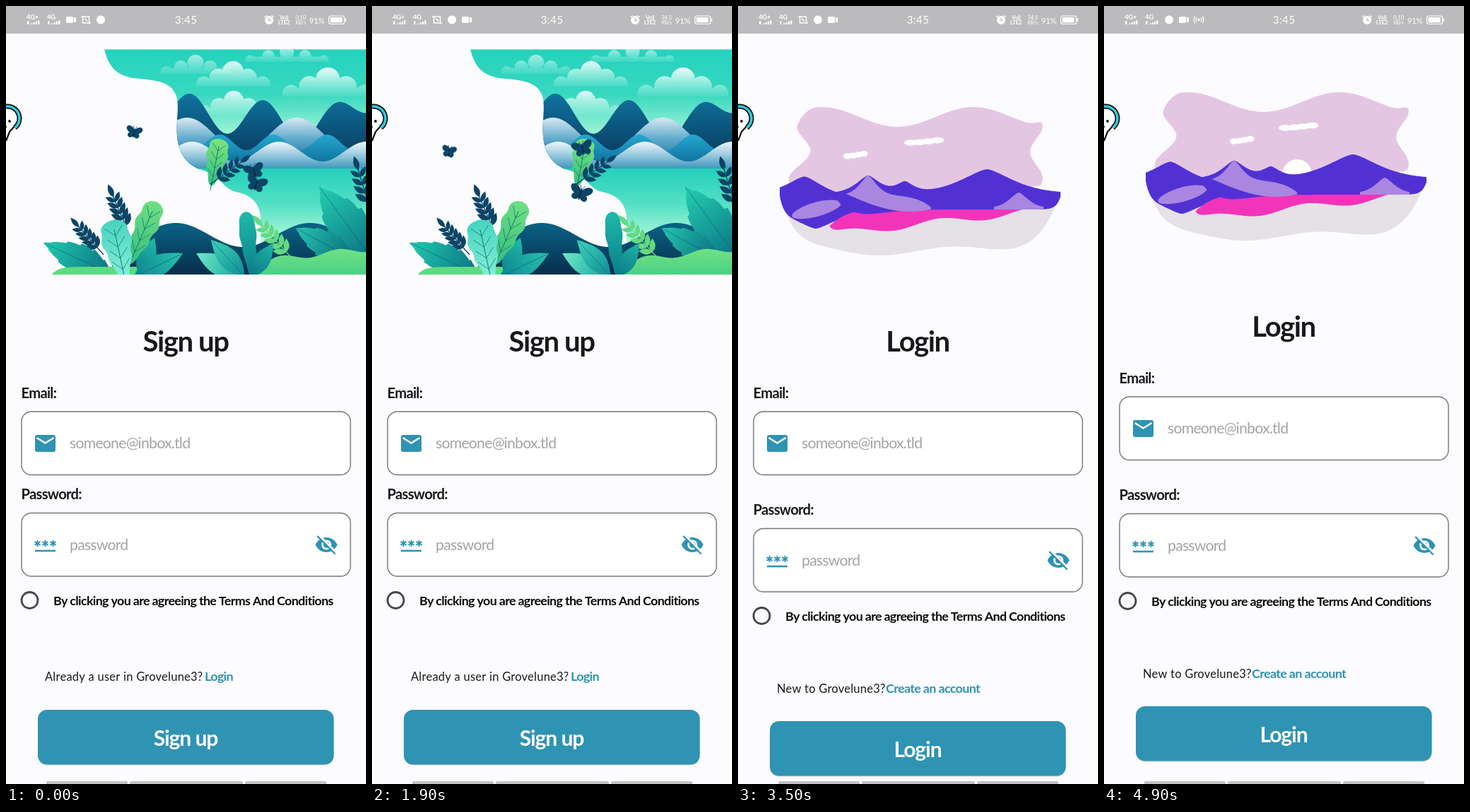
These frames come from a looping animation (509 by 1101 pixels, 5 s). An HTML page with a canvas:

```html
<!DOCTYPE html>
<html lang="en">
<head>
<meta charset="utf-8">
<title>Sign up and login</title>
<style>
html, body { margin: 0; width: 100%; height: 100%; overflow: hidden; background: #fcfbfe; }
canvas { display: block; width: 100vw; height: 100vh; }
</style>
</head>
<body>
<canvas id="stage" width="509" height="1101"></canvas>
<script>
const ctx = document.getElementById('stage').getContext('2d');
const BLUE = '#2f93b3', NAVY = '#0a4566', INK = '#18181b', PAGE = '#fcfbfe', VEIN = '#0f7870';
const APP = 'Grovelune3';
const { PI, sin, cos, exp, abs, sqrt, max, min } = Math;

// ---- drawing helpers ----
function vgrad(y0, y1, ...stops) {
  const g = ctx.createLinearGradient(0, y0, 0, y1);
  stops.forEach((c, i) => g.addColorStop(i / (stops.length - 1), c));
  return g;
}

function at(x, y, angle, draw) {
  ctx.save();
  ctx.translate(x, y);
  ctx.rotate(angle);
  draw();
  ctx.restore();
}

function text(str, x, y, size, color, weight = 700, align = 'left', tracking = -.035) {
  ctx.font = `${weight} ${size}px Lato, sans-serif`;
  ctx.letterSpacing = tracking * size + 'px';
  ctx.textAlign = align;
  ctx.fillStyle = color;
  ctx.fillText(str, x, y);
}

function box(x, y, w, h, r, color) {
  ctx.beginPath();
  ctx.roundRect(x, y, w, h, r);
  ctx.fillStyle = color;
  ctx.fill();
}

function oval(x, y, rx, ry, color, angle = 0) {
  ctx.beginPath();
  ctx.ellipse(x, y, rx, ry, angle, 0, 2 * PI);
  ctx.fillStyle = color;
  ctx.fill();
}

const disc = (x, y, r, color) => oval(x, y, r, r, color);

function stroke(color, width) {
  ctx.strokeStyle = color;
  ctx.lineWidth = width;
  ctx.stroke();
}

function line(color, width, ...p) {
  ctx.beginPath();
  for (let i = 0; i < p.length; i += 2) ctx.lineTo(p[i], p[i + 1]);
  stroke(color, width);
}

function arc(x, y, r, from, to, color, width) {
  ctx.beginPath();
  ctx.arc(x, y, r, from, to);
  stroke(color, width);
}

// area between two curves
function band(color, x0, x1, top, bottom) {
  ctx.beginPath();
  for (let x = x0; x <= x1; x++) ctx.lineTo(x, top(x));
  for (let x = x1; x >= x0; x--) ctx.lineTo(x, bottom(x));
  ctx.fillStyle = color;
  ctx.fill();
}

const level = y => () => y;
const wave = (mid, amp, peak, period) => x => mid - amp * cos(2 * PI * (x - peak) / period);
const bump = (x, peak, width) => exp(-(abs((x - peak) / width) ** 1.5));
const fall = (x, from, width) => exp(-(x - from) / width);

// ---- plants ----
function onAxis(x0, y0, x1, y1, draw) {
  at(x0, y0, Math.atan2(y1 - y0, x1 - x0), () => draw(Math.hypot(x1 - x0, y1 - y0)));
}

function axisFill(len, from, to) {
  const g = ctx.createLinearGradient(0, 0, len, 0);
  g.addColorStop(0, from);
  g.addColorStop(1, to);
  ctx.fillStyle = g;
  ctx.fill();
}

// symmetric outline with the half width given by a function of 0..1
function outline(len, half, steps = 60) {
  ctx.beginPath();
  for (let i = 0; i <= steps; i++) ctx.lineTo(len * i / steps, -half(i / steps));
  for (let i = steps; i >= 0; i--) ctx.lineTo(len * i / steps, half(i / steps));
}

function leaf(x0, y0, x1, y1, w, from, to = from, vein) {
  onAxis(x0, y0, x1, y1, len => {
    outline(len, u => w * sin(PI * u ** .9), 20);
    axisFill(len, from, to);
    if (vein) line(vein, .8, 0, 0, len * .95, 0);
  });
}

// round-ended leaf with a wavy rim
function paddle(x0, y0, x1, y1, w, wavy, from, to, vein) {
  onAxis(x0, y0, x1, y1, len => {
    outline(len, u => w * u ** .6 * sqrt(1 - u ** 5) * (1 + wavy * sin(u * 22)));
    axisFill(len, from, to);
    if (!vein) return;
    line(vein, .9, -6, 0, len * .85, 0);
    for (let u = .2; u < .8; u += .18) {
      line(vein, .7, len * (u + .15), -w * .45, len * u, 0, len * (u + .15), w * .45);
    }
  });
}

// broad leaf with notched edges
function palm(x0, y0, x1, y1, w, from, to) {
  onAxis(x0, y0, x1, y1, len => {
    outline(len, u => w * sin(PI * u ** .85) * (.84 + .16 * (u * 5.5 % 1)), 99);
    axisFill(len, from, to);
    line('rgba(5,70,95,.4)', 1, 0, 0, len, 0);
  });
}

function sprig(x0, y0, x1, y1, n, size, color) {
  onAxis(x0, y0, x1, y1, len => {
    line(color, 1.3, 0, 0, len, 0);
    for (let i = 0; i < n; i++) {
      const x = len * (.22 + .66 * i / n), k = size * (1 - .25 * i / n);
      for (const s of [-1, 1]) leaf(x, 0, x + k * .75, s * k * .7, k * .22, color);
    }
    leaf(len * .85, 0, len + size * .5, 0, size * .2, color);
  });
}

// ---- sign up picture ----
function butterfly(x, y, size, tilt, phase) {
  const u = size / 26, flap = .9 + .1 * sin(phase);
  at(x, y, tilt, () => {
    for (const s of [-1, 1]) {
      oval(s * 7 * u * flap, -4 * u, 7.5 * u * flap, 4.6 * u, NAVY, -s * .6);
      oval(s * 5 * u * flap, 4 * u, 5 * u * flap, 4 * u, NAVY, s * .6);
      line(NAVY, .7, 0, -4 * u, s * 3 * u, -10 * u);
    }
    oval(0, 1, 1.3 * u, 7 * u, '#06304c');
  });
}

function cloud(x, base, w, h, alpha) {
  ctx.save();
  ctx.beginPath();
  ctx.rect(x - w, base - h * 1.5, w * 2, h * 1.5);
  ctx.clip();
  ctx.beginPath();
  for (let k = -2; k <= 2; k++) {
    const cx = x + .2 * k * w, cy = base - h * (.58 - .24 * abs(k)), r = h * (.42 - .06 * abs(k));
    ctx.moveTo(cx + r, cy);
    ctx.arc(cx, cy, r, 0, 2 * PI);
  }
  ctx.rect(x - w * .4, base - h * .3, w * .8, h * .3);
  ctx.fillStyle = vgrad(base - h, base, `rgba(248,255,254,${alpha})`, 'rgba(225,255,246,.1)');
  ctx.fill();
  ctx.restore();
}

const view = new Path2D('M139 61C145 86 156 98 180 102C208 105 234 105 241 128C246 146 239 165 243 192C247 216 262 228 280 233C303 240 306 258 325 263C350 268 362 282 360 310V345H509V61Z');

function scenery(s) {
  ctx.save();
  ctx.clip(view);
  ctx.fillStyle = vgrad(61, 190, '#25d2bd', '#38d8c0', '#aff9da');
  ctx.fillRect(130, 61, 379, 170);
  cloud(397 - 15 * s, 79, 130, 24, .75);
  cloud(268 - 19 * s, 96, 104, 27, .6);
  cloud(321 - 6 * s, 114, 104, 36, .9);
  cloud(455 - 8 * s, 128, 130, 41, .95);
  cloud(322 - 10.5 * s, 154, 104, 34, .9);

  const peaks = wave(150, 26, 260, 104);
  band(vgrad(120, 200, '#0f76a2', '#0a4469'), 230, 509,
    x => peaks(x) + (x - 260) * .09 - 45 * bump(x, 515, 30), level(231));
  band(vgrad(155, 222, '#e4eef6', '#5fa9cc', '#15709d'), 230, 509, wave(182, 24, 256, 155), level(231));
  band(vgrad(178, 226, '#28acd4', '#0d6c9a'), 265, 509, wave(193, 11, 302, 76), level(231));
  band(vgrad(191, 230, '#f2f8fb', '#9ccbe0', '#3f97bd'), 230, 509, wave(206, 14, 386, 123), level(231));

  ctx.fillStyle = vgrad(230, 330, '#24d0bb', '#53dfc5', '#acf8d9');
  ctx.fillRect(230, 230, 279, 130);
  ctx.restore();
}

function rightBank() {
  sprig(516, 292, 495, 222, 4, 20, NAVY);
  palm(518, 358, 443, 256, 32, '#0b6f83', '#24cfb0');
  palm(490, 358, 409, 314, 21, '#0a6a80', '#25c6ad');
  band(vgrad(342, 380, '#72e283', '#4bd085'), 345, 509,
    x => 355 - (x - 400) * .1 + 4 * sin(x / 13) + 28 * fall(x, 345, 14), level(381));
  sprig(408, 361, 355, 303, 5, 19, '#64d983');
  leaf(330, 382, 269, 350, 14, '#18a99f', '#70e8c9');
  leaf(337, 382, 290, 331, 14, '#0f8c94', '#3fd3b8', '#117a86');
  paddle(348, 386, 339, 291, 16, .05, '#087987', '#20bba9');
  leaf(345, 384, 378, 336, 12, '#0a7485', '#1fb5a5');
}

function leftBank() {
  sprig(175, 325, 148, 261, 5, 19, NAVY);
  sprig(138, 352, 97, 306, 5, 17, NAVY);
  palm(150, 380, 53, 335, 23, '#0a7084', '#22caae');
  band('#5ddb82', 64, 200, x => 369 + 12 * fall(x, 64, 9), level(381));
  leaf(188, 382, 210, 328, 13, '#0c7d89', '#22bba9');
  paddle(174, 366, 213, 277, 22, .1, '#34bd81', '#70df82', VEIN);
  leaf(180, 384, 250, 350, 15, '#0b8290', '#28c4ae', '#0c6d7f');
  paddle(169, 390, 150, 303, 28, .07, '#8aefda', '#45d4bf', VEIN);
}

function lake(t) {
  const s = t / 1000, bob = sin(s * 4);
  ctx.save();
  ctx.beginPath();
  ctx.rect(0, 61.5, 509, 318.5);
  ctx.clip();
  scenery(s);
  band(vgrad(306, 375, '#0a6386', '#06314f'), 150, 509, wave(324, 17, 240, 190), level(381));
  paddle(290, 255, 303, 188, 20, .09, '#2fc07f', '#7ee37d', VEIN);
  sprig(289, 252, 339, 216, 4, 17, NAVY);
  butterfly(181 - 38 * s, 179 + 7 * s * s + 2 * bob, 24, .2, s * 19);
  butterfly(354 - 54 * s + 12 * s * s, 252 + 7 * s, 31, .3, s * 17);
  butterfly(351 - 28 * s, 234 - 34 * s + 9 * s * s, 30, -.25, s * 18);
  rightBank();
  leftBank();
  ctx.restore();
}

// ---- login picture ----
function puff(x, y, w) {
  for (let k = -1.5; k <= 1.5; k++) oval(x + k * w * .24, y - k * 1.2 + 1.2 * cos(k * 3), w * .18, 4.2, '#fff');
}

// soft-cornered panel with pinched sides
function sky(color) {
  const top = wave(136, 15, 118, 215), pinch = y => cos(2 * PI * (y - 148) / 75), p = [];
  for (let x = 100; x <= 412; x += 24) p.push([x, top(x)]);
  for (let y = 142; y <= 244; y += 12) p.push([422 + 10 * pinch(y), y]);
  for (let y = 244; y >= 142; y -= 12) p.push([90 - 14 * pinch(y) - (y - 185) * .15, y]);
  ctx.beginPath();
  p.forEach(([x, y], i) => {
    const [nx, ny] = p[(i + 1) % p.length];
    if (!i) ctx.moveTo((p.at(-1)[0] + x) / 2, (p.at(-1)[1] + y) / 2);
    ctx.quadraticCurveTo(x, y, (x + nx) / 2, (y + ny) / 2);
  });
  ctx.fillStyle = color;
  ctx.fill();
}

function hills(t) {
  const a = (t - 3000) / 1000, purple = '#5231d4', lilac = '#a986e0';
  const shore = wave(326, 6, 305, 210), ripple = wave(0, 5, 285, 130);
  ctx.save();
  ctx.translate(0, 21);
  ctx.globalAlpha = max(0, min(1, (t - 2500) / 660));
  sky('#e4c6e2');
  band('#e6e1e6', 65, 447, level(260), x => shore(x) - 60 * fall(x, 65, 18) - 62 * fall(447, x, 30));
  puff(159 + 13 * a + 3.2 * a * a, 190, 32);
  puff(259 + 8.5 * a, 171, 52);
  if (t > 3500) disc(273, 256 - 18 * (a - .9), 21, '#fff');

  band(purple, 59, 220,
    x => 243 - 23 * bump(x, 94, 32) + 30 * ((x - 59) / 161) ** 3,
    x => 272 + 22 * bump(x, 110, 36) - 28 * fall(x, 59, 6));
  band(lilac, 76, 146,
    x => 276 - (x - 76) * .25 - 11 * sqrt(abs(sin(PI * (x - 76) / 70))),
    x => 276 - (x - 76) * .25 + 10 * sqrt(abs(sin(PI * (x - 76) / 70))));
  band('#f234bb', 130, 413,
    x => 264 + 26 * fall(x, 130, 25),
    x => 300 - (x - 150) * .115 + ripple(x) - 9 * fall(x, 130, 6));
  band(purple, 134, 456,
    x => 244 - 25 * bump(x, 184, 24) - 15 * bump(x, 236, 18) - 34 * bump(x, 352, 52),
    x => 267 + 7 * bump(x, 180, 45) - 28 * fall(x, 134, 12) - 18 * fall(456, x, 6));
  band(lilac, 153, 273,
    x => 247 - 28 * bump(x, 184, 17) + 17 * ((x - 153) / 120) ** 6,
    x => 245 + 25 * sin(PI * (x - 153) / 180));
  band(lilac, 362, 432, x => 265 - 22 * bump(x, 397, 19), level(267));
  ctx.restore();
}

// ---- form ----
function field(y, hint) {
  box(22, y, 465, 89.5, 14, '#fff');
  stroke('#77757a', 1.4);
  text(hint, 90, y + 52, 21.2, '#a4a3a7', 400);
}

function envelope(y) {
  box(41, y - 12, 29, 24, 3, BLUE);
  line('#fff', 2.6, 43.5, y - 8, 55.5, y - .5, 67.5, y - 8);
}

function stars(y) {
  for (let i = -1; i <= 1; i++) {
    for (let k = 0; k < 3; k++) {
      at(55.5 + i * 11, y - 2, k * PI / 3, () => line(BLUE, 2, 0, -4.6, 0, 4.6));
    }
  }
  line(BLUE, 2.6, 41, y + 8.5, 70, y + 8.5);
}

function hiddenEye(y) {
  at(453, y, 0, () => {
    ctx.beginPath();
    ctx.moveTo(-15.5, 0);
    for (const s of [1, -1]) ctx.bezierCurveTo(-9 * s, -14 * s, 9 * s, -14 * s, 15.5 * s, 0);
    ctx.fillStyle = BLUE;
    ctx.fill();
    disc(0, 0, 7, '#fff');
    disc(0, 0, 4.2, BLUE);
    line('#fff', 3, -10, -13, 15, 12);
    line(BLUE, 2.4, -13, -12.5, 12.5, 13);
  });
}

function form(title, pass, ask, link, linkX, linkY, buttonY) {
  text(title, 254, 489, 40, INK, 700, 'center');
  text('Email:', 21.5, 554.5, 20.2, INK);
  field(574, 'someone@inbox.tld');
  envelope(619);
  text('Password:', 21.5, pass - 20, 20.2, INK);
  field(pass, 'password');
  stars(pass + 45);
  hiddenEye(pass + 45);
  arc(33.5, pass + 123.5, 11.5, 0, 2 * PI, '#48464b', 2.8);
  text('By clicking you are agreeing the Terms And Conditions', 67, pass + 130, 17.8, '#09090b');
  text(ask, 55, linkY, 16.4, INK, 400, 'left', .018);
  text(link, linkX, linkY, 17.9, BLUE);
  box(45, buttonY + 1, 418.5, 77.5, 13, 'rgba(0,0,0,.15)');
  box(45, buttonY, 418.5, 77.5, 13, BLUE);
  text(title, 254, buttonY + 51, 30, '#fff', 700, 'center');
}

function signup(t) {
  lake(t);
  form('Sign up', 717.5, `Already a user in ${APP}?`, 'Login', 281, 955, 996);
}

function login(t) {
  const clamp = v => max(0, min(1, v));
  const scroll = 21 * clamp((t - 3600) / 200);
  const pull = .0071 * min(clamp((t - 3700) / 200), clamp((4600 - t) / 600));
  ctx.save();
  ctx.translate(0, 1101);
  ctx.scale(1, 1 + pull);
  ctx.translate(0, -1101 - scroll);
  hills(t);
  form('Login', 739.5, `New to ${APP}?`, 'Create an account', 209, 972, 1012);
  ctx.restore();
  if (t >= 3700 && t < 4200) {
    disc(419, 807 - (t - 3900) * .12, 13.5, 'rgba(255,255,255,.85)');
    stroke('#8debd0', 1.2);
  }
}

// ---- phone chrome ----
const notices = {
  cam(x) {
    box(x - 7, 15, 10, 9, 1.5, '#fff');
    line('#fff', 3, x + 5.5, 16, x + 5.5, 23);
  },
  shot(x) {
    box(x - 4.5, 15, 9, 9, 0, 'transparent');
    stroke('#fff', 1.5);
    line('#fff', 1.5, x - 7, 15, x - 4, 15);
    line('#fff', 1.5, x + 4, 24, x + 7, 24);
    line('#fff', 1.5, x - 2, 17.5, x + 2, 21.5);
  },
  dot(x) { disc(x, 19.5, 6, '#fff'); },
  cast(x) {
    disc(x, 19.5, 1.7, '#fff');
    for (const r of [4, 7]) for (const a of [0, PI]) arc(x, 19.5, r, a - .75, a + .75, '#fff', 1.2);
  }
};

function signal(x, label) {
  text(label, x, 19, 9.5, '#fff');
  for (let i = 1; i <= 4; i++) ctx.fillRect(x + 3 + i * 3.3, 26 - i * 1.4, 2.2, i * 1.4);
  ctx.fillRect(x + 1, 21.5, 2.5, 4.5);
}

function statusBar(t) {
  ctx.fillStyle = '#bbbbbd';
  ctx.fillRect(0, 0, 509, 39);
  signal(29, '4G+');
  signal(58, '4G');
  const row = t < 300 ? ['cam', 'shot', 'dot'] : t < 3700 ? ['shot', 'dot', 'cam'] : ['dot', 'cam', 'cast'];
  row.forEach((name, i) => notices[name](92 + i * 21));
  text('3:45', 254.5, 25, 15, '#fff', 400, 'center', .03);
  disc(372, 20, 6, '#fff');
  line('#bbbbbd', 1.3, 372, 16.5, 372, 20.5, 375, 20.5);
  for (const s of [-1, 1]) line('#fff', 1.6, 372 + s * 6.5, 16, 372 + s * 3.5, 13.5);
  const rate = t < 1000 ? '0.10' : t < 1900 ? '0.30' : t < 4300 ? '34.5' : '0.10';
  text('Vo))', 393, 18.5, 8, '#fff', 700, 'center');
  text('LTE2', 393, 26, 8, '#fff', 700, 'center');
  text(rate, 416.5, 19, 8, '#fff', 400, 'center');
  text('KB/s', 416.5, 26, 7, '#fff', 400, 'center');
  text('91%', 439.5, 24.5, 11.5, '#fff', 400, 'center');
  box(456.5, 14, 22, 11.5, 3, 'transparent');
  stroke('#fff', 1.2);
  box(458.5, 16, 17, 7.5, 1.5, '#fff');
  ctx.fillRect(479.5, 17.5, 1.5, 4.5);
}

function sideHandle() {
  disc(-1, 159, 17, '#fff');
  line('#111', 2.2, 14, 168, 5, 178, 0, 191);
  for (const [w, c] of [[7, '#111'], [3.6, '#35c8dc']]) arc(2, 159, 17, -2, .9, c, w);
  disc(5, 163, 1.9, '#111');
  disc(-1, 171, 1.9, '#111');
}

function navBar() {
  for (const [x, w] of [[57, 115], [175, 160], [338, 115]]) box(x, 1097, w, 6, 2, '#c3c3c5');
}

function frame(now) {
  const t = Math.floor((now % 5000) / 100) * 100;
  ctx.fillStyle = PAGE;
  ctx.fillRect(0, 0, 509, 1101);
  (t < 2600 ? signup : login)(t);
  statusBar(t);
  sideHandle();
  navBar();
}

const start = performance.now();
function tick() {
  frame(performance.now() - start);
  requestAnimationFrame(tick);
}
tick();
</script>
</body>
</html>
```
